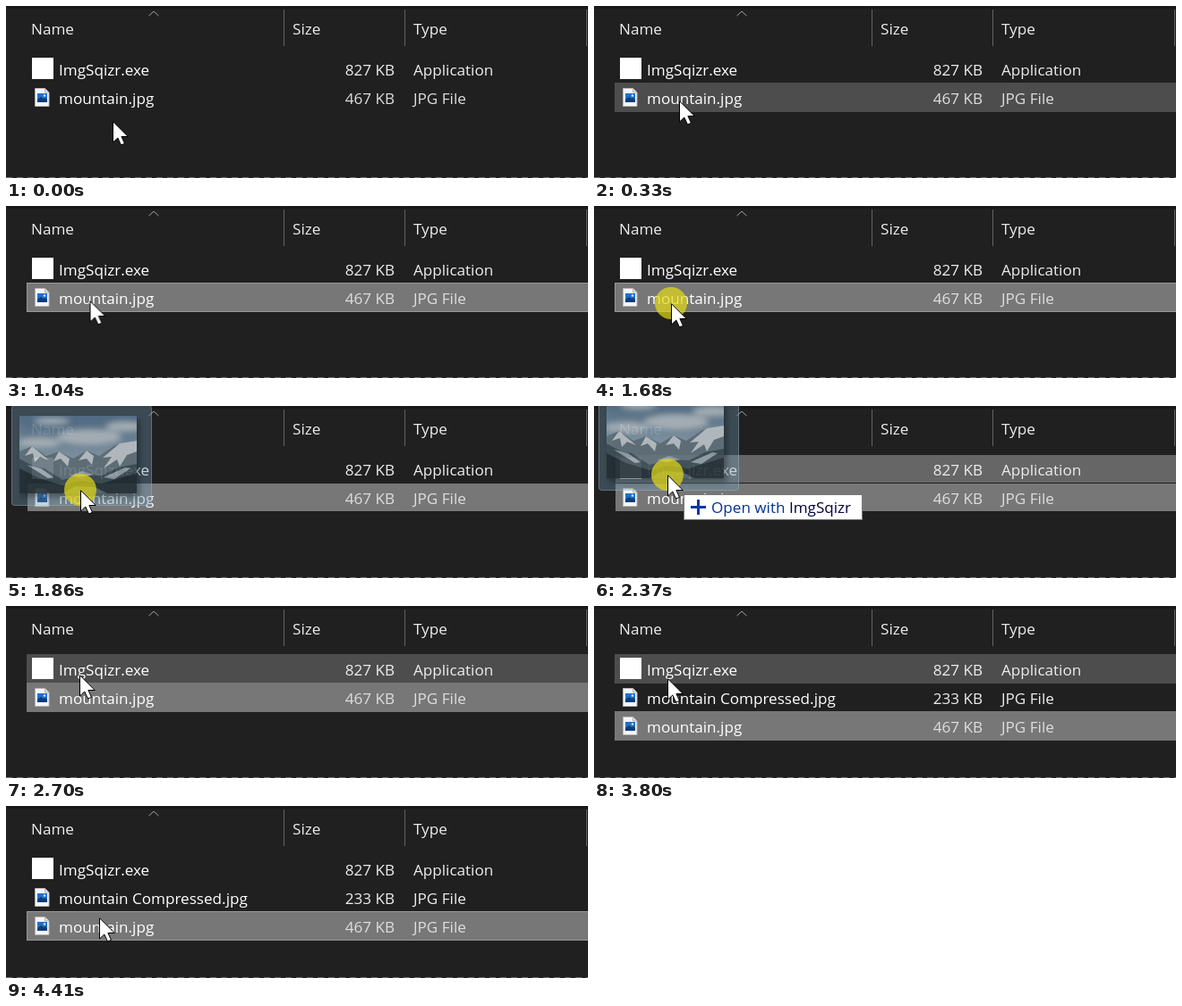
Animation of 650x193 px, one loop 4460 ms. Source, as an HTML page:

```html
<!DOCTYPE html>
<html lang="en">
<head>
<meta charset="utf-8">
<title>Drag a file onto an app</title>
<style>
  html, body { margin: 0; width: 100%; height: 100%; overflow: hidden; background: #202020; }
  svg { display: block; }
  text { font: 17.1px "Open Sans", "Noto Sans", sans-serif; fill: #fff; white-space: pre; }
  .dim { fill: #ededed; }
  #photo .dim { fill: #dedede; }
  .end { text-anchor: end; }

  /* every part shares one 4460 ms loop with hard changes */
  .anim { animation: 4460ms step-end infinite; }
  #pointer { animation-name: move; }
  #app-bg { animation-name: app-bg; }
  #photo { animation-name: push-down; }
  #photo-bg { animation-name: photo-bg; }
  #result { animation-name: result; }
  #result-bg { animation-name: result-bg; }
  #press { animation-name: press; }
  #ghost { animation-name: ghost; }
  #tip { animation-name: tip; }

  @keyframes move {
    0%, 1.12% { transform: translate(119px, 129px); animation-timing-function: steps(6, jump-both); }
    7.39%, 23.31% { transform: translate(95px, 106px); animation-timing-function: steps(5, jump-both); }
    28.47%, 37.66% { transform: translate(86px, 106px); animation-timing-function: steps(1, jump-start); }
    38.67% { transform: translate(86px, 109px); animation-timing-function: steps(3, jump-both); }
    41.7%, 42.82% { transform: translate(83px, 94px); animation-timing-function: steps(5, jump-both); }
    47.98%, 52.46% { transform: translate(82px, 79px); animation-timing-function: steps(1, jump-both); }
    53.13%, 78.25% { transform: translate(82px, 77px); animation-timing-function: steps(5, jump-both); }
    85.2%, 91.92% { transform: translate(82px, 81px); animation-timing-function: steps(7, jump-both); }
    98.87%, 100% { transform: translate(104px, 125px); }
  }
  @keyframes app-bg {
    0% { fill: transparent; stroke: transparent; }
    45.96% { fill: #666; stroke: #202020; }
    60.53% { fill: #4d4d4d; stroke: #4d4d4d; }
    91.92%, 100% { fill: transparent; stroke: transparent; }
  }
  @keyframes photo-bg {
    0% { fill: transparent; stroke: transparent; }
    4.25% { fill: #4d4d4d; stroke: #4d4d4d; }
    17.04% { fill: #777; stroke: #999; }
    38.67% { fill: #777; stroke: #202020; }
    60.53% { fill: #777; stroke: #777; }
    97.89%, 100% { fill: #777; stroke: #999; }
  }
  @keyframes push-down {
    0% { transform: none; }
    78.25%, 100% { transform: translateY(32px); }
  }
  @keyframes result {
    0% { visibility: hidden; }
    78.25%, 100% { visibility: visible; }
  }
  @keyframes result-bg {
    0% { fill: transparent; stroke: transparent; }
    91.92% { fill: #4d4d4d; stroke: #4d4d4d; }
    97.89%, 100% { fill: transparent; stroke: transparent; }
  }
  @keyframes press {
    0% { opacity: 0; }
    17.04% { opacity: .7; }
    17.93% { opacity: .35; }
    18.83% { opacity: 0; }
    32.51% { opacity: .7; }
    57.62% { opacity: .35; }
    59.08%, 100% { opacity: 0; }
  }
  @keyframes ghost {
    0% { visibility: hidden; }
    38.67% { visibility: visible; }
    57.62%, 100% { visibility: hidden; }
  }
  @keyframes tip {
    0% { visibility: hidden; }
    52.46% { visibility: visible; }
    57.62%, 100% { visibility: hidden; }
  }
</style>
</head>
<body>
<svg width="650" height="193" viewBox="0 0 650 193">
  <defs>
    <linearGradient id="sky" x2="0" y2="1">
      <stop offset="0" stop-color="#56748f"/>
      <stop offset=".5" stop-color="#8fa6b8"/>
    </linearGradient>
    <filter id="soft"><feGaussianBlur stdDeviation="3"/></filter>
    <g id="jpg">
      <path d="M32.5 92.5h11l4.5 4.5v15.5h-15.5z" fill="#f6f6f6" stroke="#b5b5b5"/>
      <path d="M43.5 92.5v4.5h4.5" fill="#ddd" stroke="#b5b5b5"/>
      <path d="M35 98h11v10h-11z" fill="#2171c7"/>
      <path d="M35 108v-3l4-3 3 2 2-1 2 2v3z" fill="#0d3c7c"/>
      <circle cx="43" cy="100.5" r="1.2" fill="#cfe6ff"/>
    </g>
  </defs>

  <!-- window frame and column heads -->
  <rect width="650" height="193" fill="#202020"/>
  <rect width="650" height="3" fill="#191919"/>
  <path d="M310.5 4v41M445.5 4v41M648.5 4v41" stroke="#636363"/>
  <path d="M159.5 11l5.5-5 5.5 5" fill="none" stroke="#a0a0a0"/>
  <path d="M0 192.5h650" stroke="#6c6c6c" stroke-dasharray="7 5"/>
  <text class="dim" x="28" y="32">Name</text>
  <text class="dim" x="320" y="32">Size</text>
  <text class="dim" x="455" y="32">Type</text>

  <!-- file list -->
  <g>
    <rect id="app-bg" class="anim" x="23.5" y="54.5" width="640" height="32" fill="none"/>
    <rect x="29" y="58" width="24" height="24" fill="#fff"/>
    <text x="59" y="78">ImgSqizr.exe</text>
    <text class="dim end" x="434" y="78">827 KB</text>
    <text class="dim" x="455" y="78">Application</text>
  </g>
  <g id="result" class="anim">
    <rect id="result-bg" class="anim" x="23.5" y="86.5" width="640" height="32" fill="none"/>
    <use href="#jpg"/>
    <text x="59" y="110">mountain Compressed.jpg</text>
    <text class="dim end" x="434" y="110">233 KB</text>
    <text class="dim" x="455" y="110">JPG File</text>
  </g>
  <g id="photo" class="anim">
    <rect id="photo-bg" class="anim" x="23.5" y="86.5" width="640" height="32" fill="none"/>
    <use href="#jpg"/>
    <text x="59" y="110">mountain.jpg</text>
    <text class="dim end" x="434" y="110">467 KB</text>
    <text class="dim" x="455" y="110">JPG File</text>
  </g>

  <g id="tip" class="anim">
    <rect x="100.5" y="99.5" width="199" height="28" fill="#fff" stroke="#767676"/>
    <path d="M108 113.5h17M116.5 105v17" stroke="#0a37a8" stroke-width="3"/>
    <text x="131" y="120" style="fill:#039">Open with <tspan fill="#00003c">ImgSqizr</tspan></text>
  </g>

  <!-- pointer with everything it carries; its tip is the local zero point -->
  <g id="pointer" class="anim">
    <g id="ghost" class="anim">
      <rect x="-76.5" y="-94.5" width="156" height="112" rx="3" fill="#6e96af" fill-opacity=".36" stroke="#9dbdd0" stroke-opacity=".45"/>
      <rect x="-65" y="-79" width="131" height="87" opacity=".35" filter="url(#soft)"/>
      <svg x="-68" y="-83" width="131" height="87" opacity=".8">
        <rect width="131" height="87" fill="url(#sky)"/>
        <g fill="#c3ccd3" filter="url(#soft)">
          <ellipse cx="78" cy="24" rx="36" ry="9"/>
          <ellipse cx="118" cy="12" rx="22" ry="6"/>
          <ellipse cx="22" cy="30" rx="24" ry="6"/>
          <ellipse cx="36" cy="6" rx="20" ry="4"/>
        </g>
        <path d="M0 40l14-6 16 11 14-5 16 8 15-9 14 6 18-12 24-5v59H0z" fill="#6d7c87"/>
        <path d="M14 34l-8 11 9-3 2 10 6-6 10 4zM44 40l-6 11 8-3 8 9 2-9zM75 39l-9 11 9-2 6 7 2-10zM112 31l-19 16 10-1-9 13 15-10 3 8 8-13 11-4V28z" fill="#d3dadf"/>
        <path d="M0 48l16 9 12 2 20 13 22-6 22 1 18-9 21-4v33H0z" fill="#43525b"/>
        <path d="M8 55l24 15 6-1-14-10zM94 69l24-11 6 1-18 12zM56 67l14-5 12 4-14 3z" fill="#a3afb7"/>
        <path d="M0 59l22 11 26 8 20-5 24 3 39-12v23H0z" fill="#222e35"/>
        <path d="M48 87l14-8 22 1 14 7z" fill="#566a75"/>
      </svg>
    </g>
    <circle id="press" class="anim" r="18" fill="#e6dc14" opacity="0"/>
    <path d="M.5 .8v23.2l5.3-5 3.7 8 4-1.7-3.6-7.8h7.3z" fill="#fff" stroke="#000"/>
  </g>
</svg>
</body>
</html>
```
